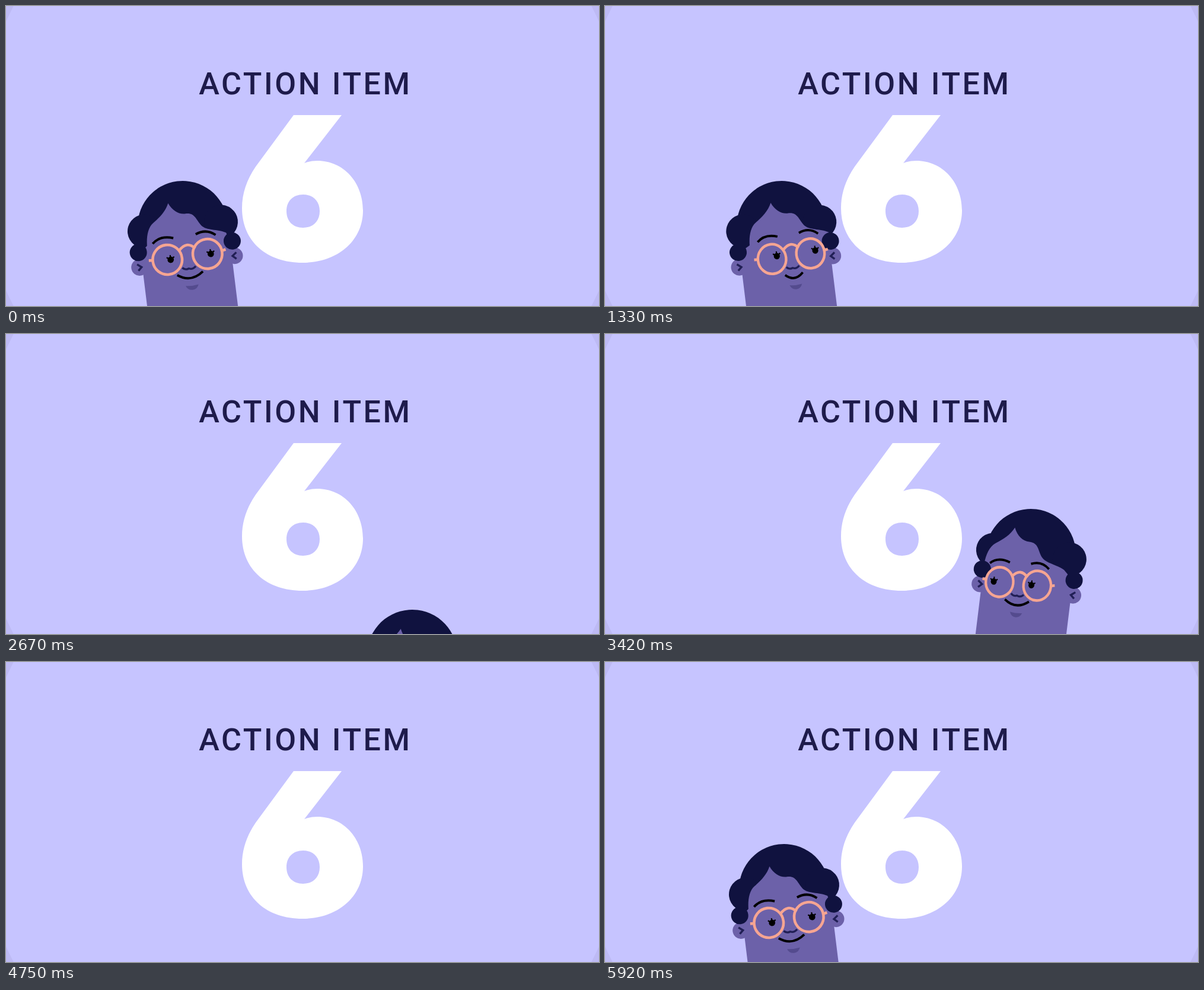
Recreate the animation shown at these times as an HTML page. Size 1000x506 px, loop 6010 ms.

```html
<!DOCTYPE html>
<html lang="en">
<head>
<meta charset="utf-8">
<title>Action item</title>
<style>
  html, body { margin: 0; width: 100%; height: 100%; overflow: hidden; background: #bdbaf4; }
  svg { display: block; width: 100%; height: 100%; }
  .title { font: 500 52px Roboto, Inter, sans-serif; letter-spacing: 3.6px; fill: #1e1b4b; text-anchor: middle; }
  .hair { fill: #10123f; }
  .skin { fill: #6c61a9; }
  .chin { fill: #544b8e; }
  .line { fill: none; stroke: #000; stroke-width: 4; }
  .nose, .ear { fill: none; stroke: #211f55; stroke-width: 3.4; }
  .glasses { fill: none; stroke: #f6a592; stroke-width: 4.6; }
  .lash { stroke: #000; stroke-width: 2.2; }
</style>
</head>
<body>
<svg viewBox="0 0 1000 506">
  <circle cx="500" cy="253" r="549" fill="#c6c4ff"/>
  <text class="title" x="505" y="149">ACTION ITEM</text>
  <path aria-label="6" fill="#fff" fill-rule="evenodd" d="M485 184H566L503 265Q513 261 525 261C569 261 602 297 602 345C602 396 559 433 500 433C440 433 398 397 398 341C398 316 406 293 421 271Z
    M501 318C484 318 473 329 473 346S484 374 501 374S529 363 529 346S518 318 501 318Z"/>
  <g id="left"></g>
  <g id="right"></g>
</svg>
<script>
const LOOP = 6010, STEP = 1000 / 12, FRAMES = 72;

// Each track lists [frame, value] keys.
const people = {
  left: {
    cx: 298, tilt: -7,
    x: [[-4, 45], [-3, 31], [-2, 12], [-1, 4], [0, 0], [18, 0], [19, 2], [20, 7], [21, 27]],
    y: [[-5, 240], [-4, 170], [-3, 85], [-2, 35], [-1, 12], [0, 0], [17, 0], [18, 2], [19, 10], [20, 30], [21, 105], [22, 240]],
    turn: [[0, 1.6], [7, 9.7]],
    lookX: [[0, 5.5], [6, 9.1]],
    lookY: [[0, 0.2], [8, -1], [14, -4.4]],
    brow: [[2, 0], [14, -1.5]],
    mouth: [[3, 22], [14, 15.8]]
  },
  right: {
    cx: 718, tilt: 7,
    x: [[32, -33], [33, -21], [34, -10], [35, -4], [36, 0], [52, 0], [53, -1], [55, -6], [56, -28]],
    y: [[31, 240], [32, 170], [33, 85], [34, 35], [35, 12], [36, 0], [52, 0], [53, 2], [54, 10], [55, 28], [56, 150], [57, 240]],
    turn: [[34, -4.6], [39, -14.6], [41, -14.6], [47, -4.6]],
    lookX: [[34, -0.5], [38, -10.6], [41, -10.6], [46, -0.5]],
    lookY: [[34, -1.4], [38, -0.2], [41, -0.2], [46, -1.4]],
    brow: [[0, 0]],
    mouth: [[0, 22]]
  }
};

function sample(keys, f) {
  const i = keys.findIndex(k => k[0] >= f);
  if (i === 0) return keys[0][1];
  if (i < 0) return keys[keys.length - 1][1];
  const [f0, a] = keys[i - 1], [f1, b] = keys[i];
  const p = (f - f0) / (f1 - f0);
  return a + (b - a) * p * p * (3 - 2 * p);
}

const circle = (cls, x, y, r) => `<circle class="${cls}" cx="${x}" cy="${y}" r="${r}"/>`;
const path = (cls, d) => `<path class="${cls}" d="${d}"/>`;
const pair = draw => draw(-1) + draw(1);

// The hairline slides with the turn while the neck stays put.
function skin(s) {
  const p = (x, y) => `${x + s} ${y} `;
  return path('skin', `M-76 230V36L${p(-65, 26)}C${p(-64, 10)}${p(-60, -4)}${p(-50, -11)}` +
    `C${p(-38, -19)}${p(-27, -28)}${p(-21, -41)}C${p(-15, -27)}${p(-5, -20)}${p(6, -20)}` +
    `C${p(22, -20)}${p(22, -8)}${p(30, 3)}C${p(38, 13)}${p(56, 12)}${p(70, 20)}L76 36V230Z`);
}

function eye(x, y) {
  return `<g transform="translate(${x} ${y})">` + circle('', 0, 0.5, 5.4) +
    path('lash', 'M-6.5 -4L-3 -1.5M0 -7.5V-4M6.5 -4L3 -1.5') + '</g>';
}

function face(v) {
  const m = v.mouth, lift = 82 - (m - 16) * 0.3;
  return `<g transform="translate(${v.turn} 0) scale(${1 - 0.005 * Math.abs(v.turn)} 1)">` +
    `<g transform="translate(0 ${v.brow})">` +
    path('line', 'M-56 23.6Q-42 11 -20 18.4M18.5 16.6Q37 9 52 21.7') + '</g>' +
    eye(-34.4 + v.lookX, 53.4 + v.lookY) + eye(34.4 + v.lookX, 51.8 + v.lookY) +
    path('nose', 'M-11 70Q-6 75 0 72.5Q6 75.5 12 70') +
    circle('glasses', -34.4, 53.4, 25) + circle('glasses', 34.4, 51.8, 25) +
    path('glasses', 'M-13 41Q1 25 15 40M-59 51.5L-66 51M59 49.5L66 48') +
    path('line', `M${1 - m} ${lift + 1}Q1 97 ${1 + m} ${lift}`) +
    path('chin', 'M-9 101Q2 103 13 101Q10 109 2 109Q-6 109 -9 101Z') + '</g>';
}

function head(who, f) {
  const v = {};
  for (const k of ['x', 'y', 'turn', 'lookX', 'lookY', 'brow', 'mouth']) v[k] = sample(who[k], f);
  if (v.y >= 240) return '';
  const side = Math.max(-1, Math.min(1, v.turn / 12)), pinch = 2 * Math.abs(side);
  return `<g transform="translate(${who.cx + v.x} ${371 + v.y}) rotate(${who.tilt})">` +
    circle('hair', 0, 0, 76) +
    pair(d => circle('hair', d * 65 - side, 1, 28.5)) +
    pair(d => circle('skin', d * (81 - pinch), 60.5, 14)) +
    skin(v.turn * 0.75) +
    pair(d => `<g transform="translate(${d * (81 - pinch)} 60.5) scale(${d} 1)">` +
      path('ear', 'M3.5 -5.5L-3.5 0L2.5 5.5') + '</g>') +
    pair(d => circle('hair', d * (80 - pinch), 35.3, 14.5)) +
    face(v) + '</g>';
}

const slots = { left: document.getElementById('left'), right: document.getElementById('right') };
const start = performance.now();
let shown = -1;

function render() {
  const t = (performance.now() - start) % LOOP;
  const frame = Math.min(FRAMES - 1, Math.floor((t + 4) / STEP));
  if (frame !== shown) {
    shown = frame;
    slots.left.innerHTML = head(people.left, frame > 60 ? frame - FRAMES : frame);
    slots.right.innerHTML = head(people.right, frame);
  }
  requestAnimationFrame(render);
}
render();
</script>
</body>
</html>
```
